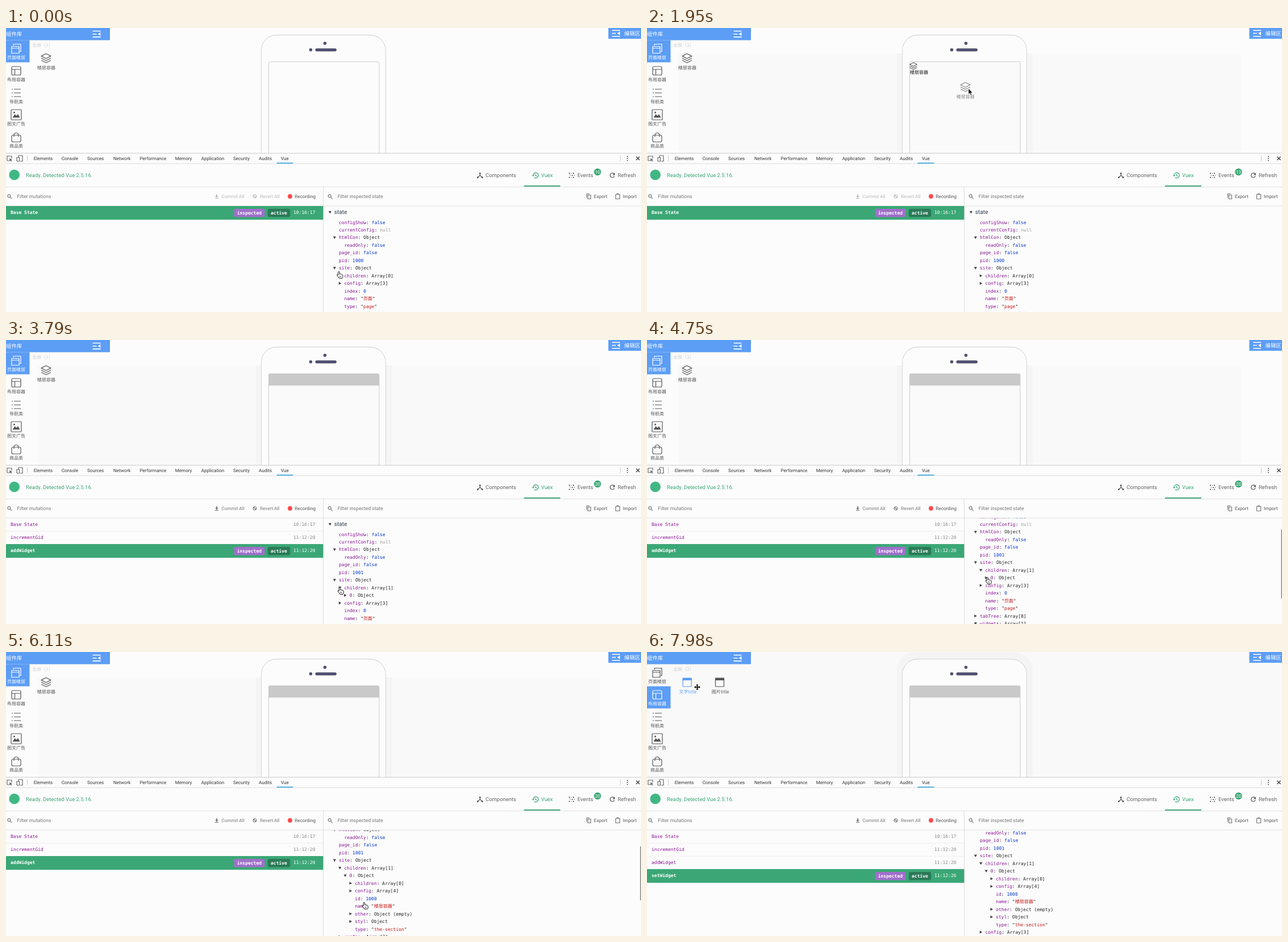
An HTML page that plays this animation: 1118x501 px, repeating every 8000 ms.

```html
<!DOCTYPE html>
<html lang="zh">
<head>
<meta charset="utf-8">
<title>Page builder with state inspector</title>
<style>
html, body { margin: 0; width: 100%; height: 100%; overflow: hidden; background: #fcfcfc; }
svg { display: block; width: 100%; height: 100%; }
text { white-space: pre; text-rendering: geometricPrecision; fill: #555; }
.ui { font: 8.2px Roboto, "Noto Sans CJK SC", sans-serif; }
.tab { font: 8.1px Roboto, sans-serif; fill: #333; }
.field { font: 8.6px Roboto, sans-serif; fill: #777; }
.big { font: 9.45px Roboto, sans-serif; fill: #666; }
.cjk { font: 8px "Noto Sans CJK SC", "Noto Sans CJK", sans-serif; fill: currentColor; }
.title { font: 500 9.4px "Noto Sans CJK SC", "Noto Sans CJK", sans-serif; fill: #fff; }
.mono { font: 8px "DejaVu Sans Mono", "Noto Sans CJK SC", monospace; fill: #222; }
.bold { font-weight: bold; }
.green { fill: #3ba776; }
.white { fill: #fff; }
.purple, .key { fill: #881391; }
.literal { fill: #03c; }
.null { fill: #999; }
.string { fill: #c41a16; }
.icon { fill: none; stroke: currentColor; stroke-width: 1.2; stroke-linejoin: round; }
.solid { fill: currentColor; stroke: none; }
</style>
</head>
<body>
<svg viewBox="0 0 1118 501" preserveAspectRatio="none">
  <defs>
    <clipPath id="pageClip"><rect width="1118" height="221"/></clipPath>
    <clipPath id="treeClip"><rect x="559" y="314.5" width="559" height="187"/></clipPath>
  </defs>
  <rect width="1118" height="501" fill="#fcfcfc"/>
  <g clip-path="url(#pageClip)"><g id="page"></g></g>
  <g id="tools"></g>
  <g id="mutations"></g>
  <g id="tree" clip-path="url(#treeClip)"></g>
  <g id="drag"></g>
  <g id="cursor"></g>
</svg>
<script>
const LOOP = 8000, BLUE = '#5c9df5', GREEN = '#3ba776', DARK = '#555', INK = '#505070';
const $ = id => document.getElementById(id);

// Picture updates come in evenly spaced bursts: start, end, count.
const bursts = [[150, 1130, 7], [1270, 1950, 5], [2250, 3200, 7], [3350, 3500, 2],
  [3790, 4750, 7], [5040, 5960, 7], [6110, 7140, 7], [7350, 7980, 5]];
const ticks = [0, ...bursts.flatMap(([a, b, n]) =>
  Array.from({ length: n }, (_, i) => Math.round(a + (b - a) * i / (n - 1))))];

// Rows are [time, value...]; values ease from one row to the next.
function track(rows, time) {
  const i = rows.findIndex(r => r[0] > time);
  if (i < 0) return rows.at(-1).slice(1);
  if (i === 0) return rows[0].slice(1);
  const [a, b] = [rows[i - 1], rows[i]];
  const p = (time - a[0]) / (b[0] - a[0]), k = p * p * (3 - 2 * p);
  return a.slice(1).map((v, j) => v + (b[j + 1] - v) * k);
}
const pointer = [[0, 586, 430], [1130, 76, 57], [1950, 566, 107], [2249, 566, 107], [3200, 589, 436],
  [3500, 587.5, 437], [3790, 587.5, 437], [4750, 599.5, 419], [5039, 599.5, 419], [5960, 630.5, 442],
  [6110, 630.5, 442], [6968, 58, 101], [7140, 20, 79], [7190, 20, 79], [7980, 88.5, 62]];
const scrolling = [[3790, 0], [4750, 31], [5040, 31], [5960, 56], [6110, 56], [6453, 64]];

const text = (x, y, s, cls = 'ui', extra = '') => `<text x="${x}" y="${y}" class="${cls}" ${extra}>${s}</text>`;
const rect = (x, y, w, h, fill, extra = '') => `<rect x="${x}" y="${y}" width="${w}" height="${h}" fill="${fill}" ${extra}/>`;
const dot = (x, y, r, fill) => `<circle cx="${x}" cy="${y}" r="${r}" fill="${fill}"/>`;
const path = (d, cls = '') => `<path d="${d}" class="${cls}"/>`;
const icon = (name, x, y, color = DARK, scale = 1) =>
  `<g class="icon" style="color:${color}" transform="translate(${x} ${y}) scale(${scale})">${icons[name]}</g>`;

const icons = {
  page: path('M-8-4h13v12h-13zM-8-1h13M-5-5.5v-2.5h13v13h-2'),
  layout: '<rect x="-8" y="-7.5" width="16" height="15" rx="2"/>' + path('M-8-2.5h16M-2.5-2.5v10'),
  list: path('M-8-6.5h2M-8 0h2M-8 6.5h2M-4-6.5h12M-4 0h12M-4 6.5h12'),
  picture: '<rect x="-9" y="-9" width="18" height="18" rx="1"/>' + path('M-6.5 5l4-6 3 3 2.5-3 3.5 6zM-5-4a1.5 1.5 0 1 0 3 0a1.5 1.5 0 1 0-3 0', 'solid'),
  bag: '<rect x="-8" y="-4" width="16" height="12" rx="2.5"/>' + path('M-4-1v-3a4 4 0 0 1 8 0v3'),
  layers: path('M0-8l8.5 4.3L0 .5-8.5-3.7zM-8.5 0L0 4.2 8.5 0M-8.5 3.7L0 8l8.5-4.3'),
  window: '<rect x="-7.5" y="-7" width="15" height="14.5" rx="1"/>' + path('M-8-8h16v4.5h-16z', 'solid'),
  fold: `<g stroke-width="1.6">${path('M-7-5.2h14M-7 0h7M-7 5.2h14')}</g>` + path('M7-3.2v6.4L2 0z', 'solid'),
  search: '<circle cx="-.7" cy="-.7" r="2.5"/>' + path('M1.2 1.2l3 3'),
  inspect: path('M1 4h-5v-8h8v4') + path('M0 0l5 2-2 1 1.5 2-1 .7-1.5-2-1.2 1.5z', 'solid'),
  device: path('M-2-2v-3h7v10h-4M-5-1.5h4.5v6.5h-4.5z'),
  close: `<g stroke-width="1.5">${path('M-3-3l6 6M3-3l-6 6')}</g>`,
  more: [-3.5, 0, 3.5].map(y => `<circle cy="${y}" r="1" class="solid"/>`).join(''),
  nodes: path('M0-3v3l-3.5 3M0 0l3.5 3') + [[0, -3.5], [-3.8, 3.5], [3.8, 3.5]].map(p => `<circle cx="${p[0]}" cy="${p[1]}" r="1.5" class="solid"/>`).join(''),
  history: path('M-4.3 0a4.6 4.6 0 1 1 1.7 3.5M0-2.5v3l2.2 1.3') + path('M-6.5-.5h4l-2 2.4z', 'solid'),
  grain: [-3.6, 0, 3.6].flatMap((x, i) => [-3.6, 0, 3.6].map((y, j) =>
    `<circle cx="${x + (j % 2 ? 1 : -.5)}" cy="${y}" r="${(i + j) % 2 ? .7 : 1.1}" class="solid"/>`)).join(''),
  refresh: path('M3.6 1.2a3.9 3.9 0 1 1-.8-4') + path('M4.5-4.8v4.2h-4.2z', 'solid'),
  commit: path('M-3 3.5h6') + path('M-1-3.5h2v3h2l-3 3-3-3h2z', 'solid'),
  revert: '<circle r="3"/>' + path('M-2-2l4 4'),
  copy: path('M-1.5-2.5h5v7h-5zM-3.5 2.5v-7h5'),
  paste: path('M-3.5-3.5h7v8h-7zM-1.5-3.5v-1h3v1')
};

const navItems = [['page', '页面楼层', 36.5, 2], ['layout', '布局容器', 75.5, 2], ['list', '导航类', 114.5, 6],
  ['picture', '图文广告', 153, 2], ['bag', '商品类', 193, 6]];

const cjk = (x, y, s, color) => `<g style="color:${color}">${text(x, y, s, 'cjk')}</g>`;

function drawPage(s, x) {
  const shaded = s >= 1270, full = s >= 6625, layoutOpen = s >= 7350;
  let out = '';
  if (shaded) {
    out += full ? rect(0, 0, 1118, 221, '#f9f9f9') : rect(55, 45, 991, 176, '#f9f9f9');
    out += full ? rect(440, 1, 239, 240, '#f4f4f4', 'rx="30"') : rect(440, 45, 239, 176, '#f5f5f5');
  }
  out += rect(449.5, 12.5, 219, 300, '#fcfcfc', 'rx="27" stroke="#dcdcdc" stroke-width="1.3"');
  out += dot(561.5, 27, 2.8, INK) + dot(536.5, 38.5, 2.8, INK) + rect(544.5, 36, 37.5, 5.2, INK, 'rx="2.6"');
  out += rect(462.5, 59.5, 194.5, 260, shaded ? '#fafafa' : '#fcfcfc', 'rx="2" stroke="#ccc" stroke-width="1"');
  if (s >= 2250) out += rect(462.5, 60, 194.5, 20.3, '#c9c9c9');
  else if (s >= 1780) out += icon('layers', 469, 67, '#333', .75) + cjk(463, 81, '楼层容器', '#111');

  out += rect(0, 0, 183, 21.5, BLUE) + text(0, 13.7, '组件库', 'title') + icon('fold', 159.5, 10.7, '#fff');
  out += rect(1060.5, 0, 58, 19, BLUE) + icon('fold', 1074, 9.5, '#fff') + text(1088.5, 12.7, '编辑区', 'title');
  const active = layoutOpen ? 1 : 0;
  out += rect(0, 21.5 + 39 * active, 41.5, 39, BLUE);
  navItems.forEach(([name, label, y, left], i) => {
    const color = i === active ? '#fff' : DARK;
    out += icon(name, 18, y, color) + cjk(left, 55 + 39 * i, label, color);
  });
  out += cjk(46, 33.2, `全部（${active + 1}）`, '#ccc');
  if (layoutOpen) {
    const hover = x > 57 ? BLUE : DARK;
    out += icon('window', 70.7, 53.5, hover) + cjk(56.5, 73, '文字title', hover);
    out += icon('window', 128, 53.5) + cjk(113.7, 73, '图片title', DARK);
  } else {
    const color = s === 1130 ? BLUE : DARK;
    out += icon('layers', 70.5, 53.3, color) + cjk(55, 73, '楼层容器', color);
  }
  $('page').innerHTML = out;
  $('page').setAttribute('transform', `translate(0 ${s >= 6797 && s < 7140 ? 1.3 : 0})`);
}

const tabs = [['Elements', 48.7], ['Console', 97.7], ['Sources', 143], ['Network', 189], ['Performance', 235.5], ['Memory', 297.7],
  ['Application', 343.7], ['Security', 400], ['Audits', 445], ['Vue', 484]];

function drawTools(s) {
  const events = s < 1270 ? 10 : s < 1780 ? 11 : s < 1950 ? 12 : s < 2250 ? 13 : 20;
  const action = s < 2250 ? '#bbb' : '#777';
  let out = rect(0, 220.5, 1118, 1, '#ccc') + rect(0, 238.7, 1118, 1, '#ddd') + rect(0, 280, 1118, 1, '#e2e2e2')
    + rect(0, 313.5, 1118, 1, '#e2e2e2') + rect(558, 281, 1, 220, '#ddd')
    + rect(37, 225, 1, 10, '#ccc') + rect(1081, 225, 1, 10, '#ccc')
    + rect(476.5, 237.5, 29, 1.8, '#43a9e0') + rect(912, 277.7, 64, 2, GREEN);
  out += icon('inspect', 6, 230, '#666') + icon('device', 24, 230, '#666') + icon('more', 1094, 230) + icon('close', 1112.5, 230, '#444');
  out += tabs.map(([name, x]) => text(x, 233, name, 'tab')).join('');
  out += dot(14.7, 259, 9.3, '#41b883') + text(35, 263.4, 'Ready. Detected Vue 2.5.16.', 'big green');
  out += icon('nodes', 834.5, 260) + text(844.3, 263, 'Components', 'big');
  out += icon('history', 932.5, 260, GREEN) + text(942, 263, 'Vuex', 'big green');
  out += icon('grain', 996, 260) + text(1006, 263, 'Events', 'big') + dot(1041.5, 254, 6.2, GREEN)
    + text(1041.5, 257, events, 'ui white', 'text-anchor="middle"');
  out += icon('refresh', 1067.5, 260) + text(1077, 263, 'Refresh', 'big');
  out += icon('search', 6, 297, '#777') + text(19.3, 300, 'Filter mutations', 'field');
  out += icon('commit', 371, 297, action) + text(379.3, 300, 'Commit All', 'ui', `style="fill:${action}"`);
  out += icon('revert', 438, 297, action) + text(447, 300, 'Revert All', 'ui', `style="fill:${action}"`);
  out += dot(500, 297, 3.9, '#ff4848') + text(508.3, 300, 'Recording');
  out += icon('search', 570.5, 297, '#777') + text(583.7, 300, 'Filter inspected state', 'field');
  out += icon('copy', 1026, 297, '#777') + text(1035, 300, 'Export');
  out += icon('paste', 1077, 297, '#777') + text(1086, 300, 'Import');
  $('tools').innerHTML = out;
}

function drawMutations(s) {
  const log = [['Base State', '10:16:17']];
  if (s >= 2250) log.push(['incrementGid', '11:12:20'], ['addWidget', '11:12:20']);
  if (s >= 7350) log.push(['setWidget', '11:12:26']);
  $('mutations').innerHTML = log.map(([name, time], i) => {
    const y = 314 + 23 * i, base = y + 14;
    if (i < log.length - 1) return rect(0, y + 22.6, 558, 1, '#eee')
      + text(8, base, name, 'mono purple') + text(506, base, time, 'mono', 'style="fill:#888"');
    return rect(0, y, 558.5, 24.2, GREEN) + text(8, base, name, 'mono bold white')
      + rect(401.5, y + 5, 54, 14.5, '#a06fcb', 'rx="3"') + text(406.7, base + .8, 'inspected', 'mono bold white')
      + rect(460.7, y + 5, 39.5, 14.5, '#2b7a57', 'rx="3"') + text(466, base + .8, 'active', 'mono bold white')
      + text(506, base, time, 'mono white');
  }).join('');
}

// Each row: depth, fold (0 none, 1 closed, 2 open), key, value, kind.
function treeRows(s) {
  const dropped = s >= 2250, open = s >= 3790, deep = s >= 5040, n = dropped ? 1 : 0;
  const rows = [[0, 0, 'configShow', 'false', 'literal'], [0, 0, 'currentConfig', 'null', 'null'],
    [0, 2, 'htmlCon', 'Object'], [1, 0, 'readOnly', 'false', 'literal'], [0, 0, 'page_id', 'false', 'literal'],
    [0, 0, 'pid', 1000 + n, 'literal'], [0, 2, 'site', 'Object'], [1, open ? 2 : 1, 'children', `Array[${n}]`]];
  if (open) rows.push([2, deep ? 2 : 1, '0', 'Object']);
  if (deep) rows.push([3, 1, 'children', 'Array[0]'], [3, 1, 'config', 'Array[4]'], [3, 0, 'id', 1000, 'literal'],
    [3, 0, 'name', '楼层容器', 'string'], [3, 1, 'other', 'Object (empty)'], [3, 1, 'styl', 'Object'],
    [3, 0, 'type', 'the-section', 'string']);
  rows.push([1, 1, 'config', 'Array[3]'], [1, 0, 'index', 0, 'literal'], [1, 0, 'name', '页面', 'string'],
    [1, 0, 'type', 'page', 'string'], [0, 1, 'tabTree', 'Array[8]'], [0, 2, 'widgets', `Array[${n}]`]);
  return rows;
}
const fold = (x, y, kind) => kind
  ? `<path transform="translate(${x} ${y}) rotate(${kind === 2 ? 0 : -90})" d="M-2.6-2h5.2L0 2.5z" fill="#444"/>` : '';

function drawTree(s) {
  const [scroll] = track(scrolling, s);
  let out = fold(570.5, 325 - scroll, 2) + text(577.7, 328.3 - scroll, 'state', 'ui', 'style="font-size:10.2px;fill:#2c3e50"');
  treeRows(s).forEach(([depth, arrow, key, value, kind], i) => {
    const x = 586 + 9.4 * depth, y = 342.7 + 13.47 * i - scroll, q = kind === 'string' ? '"' : '';
    out += fold(x - 7.6, y, arrow) + text(x, y + 2.8,
      `<tspan class="key">${key}</tspan>: ${q}<tspan class="${kind || ''}">${value}</tspan>${q}`, 'mono');
  });
  if (s >= 3950 && s < 6453) {
    const ratio = 187 / (s < 5040 ? 289 : 368);
    out += rect(1116.5, 314.5 + scroll * ratio, 2, 187 * ratio, '#8a8a8a');
  }
  $('tree').innerHTML = out;
}

const pointers = {
  arrow: '<path d="M0 0v10l2.3-2.1 1.6 3.7 1.8-.8-1.6-3.5h3.2z" fill="#000" stroke="#fff" stroke-width=".7"/>',
  hand: '<path d="M-1.2 1.2q0-1.5 1.2-1.5t1.3 1.5v3l1-.4 1.2.6 1.1-.1 1 .8q1.3 0 1.3 1.5v2q0 1.5-1.2 2.8H.5L-3 6.5q-.8-1.5.5-1.6l1.3 1z" fill="#fff" stroke="#111" stroke-width="1"/><path d="M1.5 7v2.5M3.3 7v2.5" stroke="#111" stroke-width=".7"/>',
  move: '<path d="M0-5.5l2.2 2.6H.8v2.1h2.1v-1.4L5.5 0 2.9 2.2V.8H.8v2.1h1.4L0 5.5l-2.2-2.6h1.4V.8h-2.1v1.4L-5.5 0l2.6-2.2v1.4h2.1v-2.1h-1.4z" fill="#000" stroke="#fff" stroke-width="1.2" paint-order="stroke"/>'
};
function pointerKind(s, x) {
  if (s < 150) return 'hand';
  if (s === 1130) return 'move';
  if (s < 3200) return 'arrow';
  if (s < 6282) return 'hand';
  if (s < 7140) return 'arrow';
  return x < 42 ? 'hand' : x > 57 ? 'move' : 'arrow';
}

function draw(s) {
  const [x, y] = track(pointer, s);
  drawPage(s, x);
  drawTools(s);
  drawMutations(s);
  drawTree(s);
  $('drag').innerHTML = s >= 1270 && s < 2250
    ? `<g opacity=".7" transform="translate(${x - 76} ${y - 57})">${icon('layers', 70.5, 54)}${cjk(54.7, 73.5, '楼层容器', DARK)}</g>` : '';
  $('cursor').innerHTML = `<g transform="translate(${x} ${y})">${pointers[pointerKind(s, x)]}</g>`;
}

let start, shown;
function frame(now) {
  start ??= now;
  const time = (now - start) % LOOP, s = ticks.findLast(t => t <= time);
  if (s !== shown) draw(shown = s);
  requestAnimationFrame(frame);
}
draw(shown = 0);
requestAnimationFrame(frame);
</script>
</body>
</html>
```
